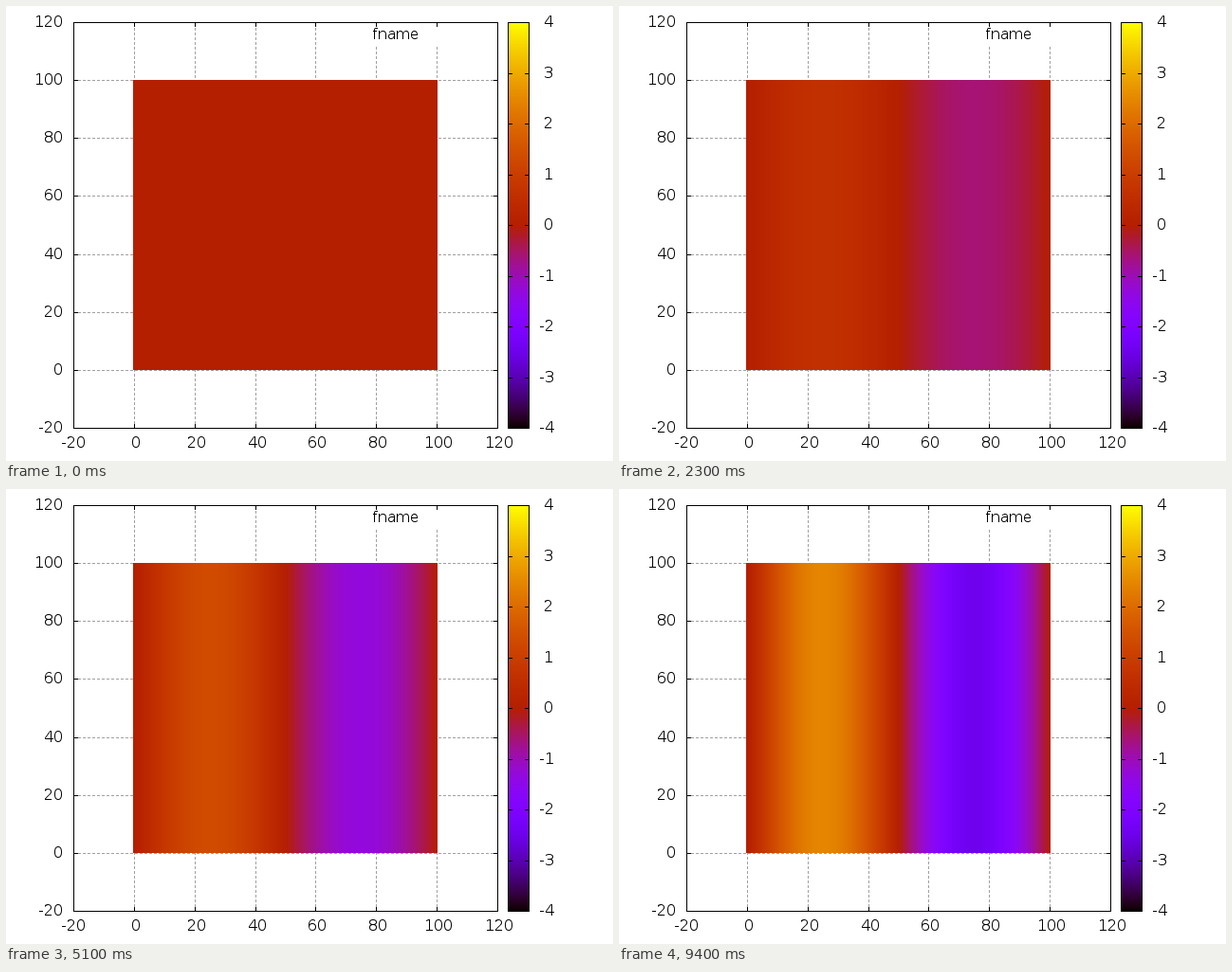
Animation of 640 by 480 pixels, one loop 10 s. Source, as a matplotlib script:

```python
import numpy as np
import matplotlib.pyplot as plt
from matplotlib.animation import FuncAnimation

W, H, DPI = 640, 480, 96
FRAMES, INTERVAL = 100, 100
GROWTH = 0.0262                                # amplitude gained per frame
LEFT, RIGHT, TOP, BOTTOM = 71, 518, 17, 445    # plot border
BAR_L, BAR_R = 529, 551                        # colour bar
TICK = 4
ADVANCE = {" ": 5, "-": 6}                     # digits advance 10 px

plt.rcParams.update({
    "font.family": "DejaVu Sans",
    "font.size": 12,
    "text.hinting": "default",
    "text.hinting_factor": 1,                  # whole-pixel glyph steps
})


def shade(v):
    """Map values in -4..4 to RGB."""
    g = np.clip((v + 4) / 8, 0, 1)
    blue = np.clip(np.sin(2 * np.pi * g), 0, 1)
    return np.stack([np.sqrt(g), g ** 3, blue], axis=-1)


def sx(x):
    return LEFT + (x + 20) / 140 * (RIGHT - LEFT)


def sy(y):
    return BOTTOM - (y + 20) / 140 * (BOTTOM - TOP)


def line(x0, y0, x1, y1, color="black", **kw):
    """One-pixel line; the renderer snaps it to the named pixel row or column."""
    ax.plot([x0, x1], [y0, y1], color=color, lw=72 / DPI, antialiased=False,
            solid_capstyle="projecting", **kw)


def frame_box(x0, x1):
    for y in (TOP, BOTTOM):
        line(x0, y, x1, y, zorder=5)
    for x in (x0, x1):
        line(x, TOP, x, BOTTOM, zorder=5)


def side_ticks(x0, x1, y):
    line(x0, y, x0 + TICK, y, zorder=5)
    line(x1, y, x1 - TICK, y, zorder=5)


def text(x, y, s):
    ax.text(x, y, s, ha="left", va="baseline", zorder=6)


def number(x, y, v, align):
    """Number with a blank for the plus sign; align is the share left of x."""
    s = f"{v: d}"
    width = sum(ADVANCE.get(c, 10) for c in s)
    text(np.floor(x - align * width), y, s)


fig = plt.figure(figsize=(W / DPI, H / DPI), dpi=DPI, facecolor="white")
ax = fig.add_axes([0, 0, 1, 1])
ax.axis("off")

# Grid, broken where the key sits
grid = dict(color="#a0a0a0", linestyle=(0, (2, 2)), dash_capstyle="butt",
            zorder=1)
for v in range(0, 101, 20):
    x, y = round(sx(v)), round(sy(v))
    line(x, BOTTOM, x, 40 if v >= 80 else TOP, **grid)
    line(LEFT, y, RIGHT, y, **grid)

# Axis ticks and numbers
for v in range(-20, 121, 20):
    x, y = round(sx(v)), round(sy(v))
    line(x, BOTTOM, x, BOTTOM - TICK, zorder=5)
    line(x, TOP, x, TOP + TICK, zorder=5)
    side_ticks(LEFT, RIGHT, y)
    number(x, 466, v, 0.5)
    number(60, y + 5, v, 1)
frame_box(LEFT, RIGHT)
text(386, 35, "fname")

# Colour bar
ramp = shade(np.linspace(4, -4, BOTTOM - TOP))[:, None]
ax.imshow(ramp, extent=[BAR_L, BAR_R, BOTTOM, TOP], aspect="auto",
          interpolation="nearest", zorder=2)
for v in range(-4, 5):
    y = int(BOTTOM - (v + 4) / 8 * (BOTTOM - TOP) + 0.5)
    side_ticks(BAR_L, BAR_R, y)
    number(562, y + 5, v, 0)
frame_box(BAR_L, BAR_R)

# Field: one sine period across the square, growing steadily
cols = np.arange(134, 455)
xs = np.clip((cols - sx(0)) / (sx(100) - sx(0)) * 100, 0, 100)
wave = np.sin(2 * np.pi * xs / 100)
field = ax.imshow(shade(0 * wave)[None], extent=[134, 455, 384, 78],
                  aspect="auto", interpolation="nearest", zorder=3)

ax.set_xlim(0, W)
ax.set_ylim(H, 0)


def update(i):
    field.set_data(shade(GROWTH * i * wave)[None])
    return [field]


anim = FuncAnimation(fig, update, frames=FRAMES, interval=INTERVAL,
                     repeat=True, repeat_delay=0, blit=False)
plt.show()
```
